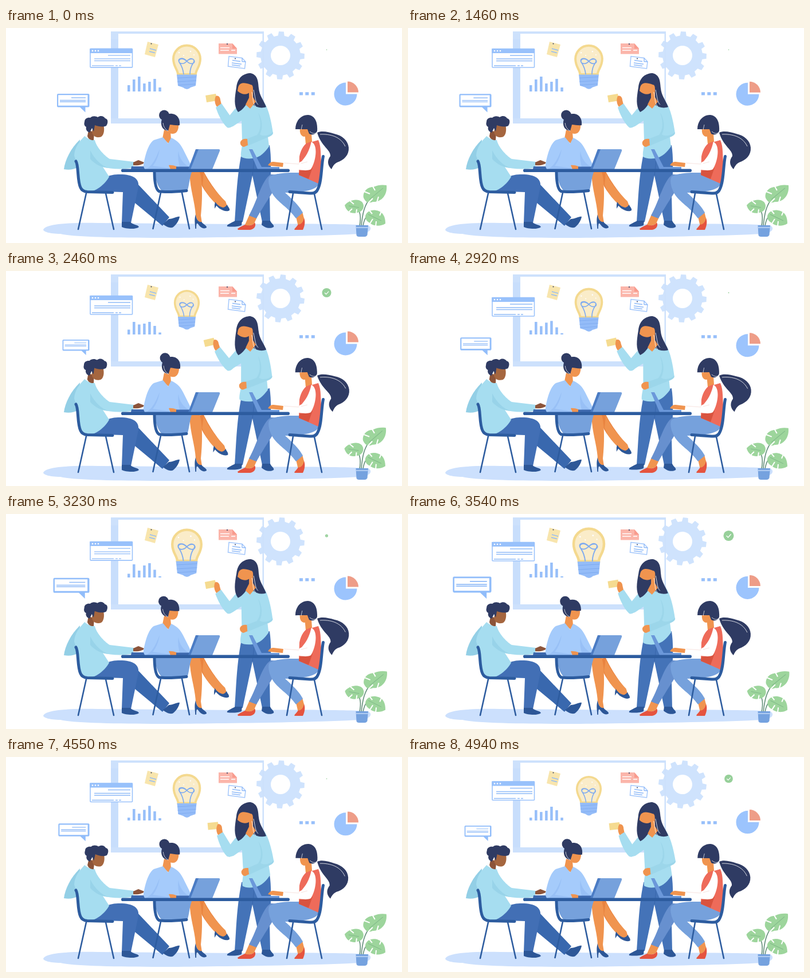
These frames come from a looping animation (691x376 px, 5040 ms). An HTML page:

```html
<!DOCTYPE html>
<html lang="en">
<head>
<meta charset="utf-8">
<title>Team meeting</title>
<style>
html, body { margin: 0; width: 100%; height: 100%; overflow: hidden; background: #fff; }
svg { display: block; width: 691px; height: 376px; }
.hair { fill: #2f3b63; }
.skin { fill: #f0944f; }
.tan { fill: #a5663f; }
.teal { fill: #a6ddf0; }
.teal2 { fill: #93cfe6; }
.navy { fill: #2d5797; }
.line { fill: none; stroke: #8fbaf8; stroke-width: 1.4; }
.chair { fill: none; stroke: #2d5c9f; stroke-linecap: round; stroke-linejoin: round; }
.white { fill: none; stroke: #fff; }
</style>
</head>
<body>
<svg viewBox="0 0 691 376">
  <path fill="#cce0fd" d="M65 353C68 344 100 340 160 341L400 343C480 342 600 342 632 345C640 349 637 358 620 360C520 365 380 366 300 367C200 367 120 366 95 360C75 360 66 356 65 353Z"/>

  <g id="gear" fill="#cfe3fd"><path id="cog"/><circle cx="479" cy="48" r="17" fill="#fff"/></g>
  <path fill="#cde1fc" fill-rule="evenodd" d="M183 6H450V167H183ZM196 10V158H447.500V10Z"/>
  <path fill="#bdd8fb" d="M183 20H196V158H183Z" opacity=".35"/>

  <g id="win">
    <rect x="147" y="36" width="73.500" height="32.500" rx="1" fill="#fff" stroke="#9ac2fb" stroke-width="1.600"/>
    <path fill="#98c1fb" d="M146.200 35.500H221V43.500H146.200Z"/>
    <g fill="#fff"><circle cx="151" cy="39.500" r="1.300"/><circle cx="156" cy="39.500" r="1.300"/><circle cx="161" cy="39.500" r="1.300"/></g>
    <path class="line" d="M178 47.500H217M154 53.500H217M154 57H217M150 65.500H188M191 65.500H195M197 65.500H201"/>
  </g>

  <g id="bars" fill="#97bff9"></g>

  <path fill="#f8e5ad" d="M247 24L266 29L260 51L242 46Z"/>
  <path class="line" d="M251 36L262 39M250 41L260 43.500"/>
  <circle cx="253.500" cy="27.500" r="1" class="hair"/>
  <path fill="#fbb5aa" d="M371 27H395L403 36V45.500H371Z"/>
  <path fill="#f89b8d" d="M395 27V36H403Z"/>
  <path class="white" stroke-width="1.600" d="M374 34.500H390M374 39H389M393 39H400"/>
  <circle cx="386" cy="28" r="1.100" class="hair"/>
  <path fill="#fff" stroke="#a3c7fb" stroke-width="1.500" d="M389 49.500L412 52.500L418 59L416.500 71L387.500 67Z"/>
  <path class="line" d="M412 52.500V58.500L418 59M395 56.500L409 58.500M394 61L411 63.300M394 64.500L409 66.500"/>
  <circle cx="400" cy="53.500" r="1" class="hair"/>

  <g id="bulb">
    <path fill="#faecc9" stroke="#f4d98f" stroke-width="4" d="M300 81C300 73 292 68 292 54A23.500 23.500 0 0 1 339 54C339 68 331 73 331 81Z"/>
    <path fill="none" stroke="#7fabef" stroke-width="1.700" d="M310 81C309 72 305 64 303 61C297 53 308 50 315.500 58C323 66 333 61 327 55C322 51 318 56 315.500 58C308 66 298 61 303 55C308 52 312 55 315.500 58C320 53 332 52 327 61C324 65 321 73 321 81"/>
    <path fill="#94bcf8" d="M298 81.500H333L331 101Q325 103 322 104Q316 110 309 104L300 101Z"/>
    <path fill="none" stroke="#7ba8ee" stroke-width=".8" d="M299 87.500L332 85.500M299 94L332 92M300 100L331 98"/>
    <g fill="#fff"><circle cx="302" cy="43" r="1.200"/><circle cx="322" cy="41" r="1.200"/><circle cx="328" cy="47" r="1"/><circle cx="310" cy="48" r="1"/></g>
  </g>

  <g id="bubble">
    <path fill="#91bdfa" d="M91 115H143.500Q145.500 115 145.500 117V136.500Q145.500 138.500 143.500 138.500H138.500V147.500L129 138.500H91Q89 138.500 89 136.500V117Q89 115 91 115Z"/>
    <path fill="#fff" d="M91.200 117.300H142.500V135.800H91.200Z"/>
    <path class="line" d="M114 122H139M94 126.500H139M94 129H139"/>
  </g>

  <path fill="#98c0fa" d="M512 112.300h6v5.200h-6zM522.300 112.300h6v5.200h-6zM532.800 112.300h6v5.200h-6z"/>
  <g id="pie">
    <path fill="#9cc4fd" d="M593 96A20 20 0 1 0 612.500 116H593Z"/>
    <path fill="#ee9d88" d="M596 94A19 19 0 0 1 615 113H596Z"/>
  </g>
  <g id="tick">
    <circle r="9.300" fill="#97d09a"/>
    <path class="white" stroke-width="1.400" d="M-4 0L-1 3L4.200 -2.800"/>
  </g>

  <!-- plant -->
  <g id="plant">
    <path fill="none" stroke="#638f7a" stroke-width="1.600" d="M620 346C622 325 625 310 636 297M617 346C620 330 618 320 612 314M623 346C625 334 630 326 637 325"/>
    <g fill="#9dd59c">
      <path d="M664 275C666 292 655 305 640 304C631 308 627 303 624 297C622 288 629 278 641 278C650 274 657 274 664 275Z"/>
      <path d="M591 310C598 301 613 297 621 304C627 311 624 321 613 323C603 326 594 321 591 310Z"/>
      <path d="M627 329C629 320 640 316 650 320C658 323 662 330 662 342C653 348 640 346 635 341C629 338 627 334 627 329Z"/>
    </g>
    <path class="white" stroke-width="2" d="M625 286L635 290M632 306L640 298M647 305L650 295M640 277L644 284M600 302L607 308M597 323L604 316M611 325L612 317M634 319L639 325M645 347L646 338M635 342L640 334M655 321L652 328"/>
    <path fill="none" stroke="#80b889" d="M658 280L634 300M598 311L616 314M632 326L655 337"/>
  </g>
  <path fill="#75a2df" d="M610.500 345H632L630.500 362Q629 365 626 365H616Q612 365 611.500 362Z"/>
  <path stroke="#d8e8ff" stroke-width="1.200" d="M611 349H631.500"/>

  <!-- standing woman -->
  <path fill="#4473b8" d="M411 219L460 205C463 225 463 250 460 290L461 339H447L430 258L413 339H399C402 300 402 265 411 219Z"/>
  <path fill="none" stroke="#3966ab" d="M430 258L433 232"/>
  <path class="navy" d="M400 337H412L411 345C405 348 393 348 386 347C384 344 393 341 400 337ZM447 337H461C463 342 469 345 467 348C460 352 451 349 446 344Z"/>
  <g id="torso">
    <path class="teal" d="M417 128L426 140L433 124L448 127C457 136 463 162 466 184C465 188 459 190 457 191L459 207C452 217 444 226 431 228C421 229 414 228 410 225C409 215 413 206 412 198L411 162L396 172L388 174L386 158L400 141Z"/>
    <path class="teal2" d="M440 148C446 165 445 178 438 187L417 195L422 206L457 191C463 189 466 186 466 182C458 189 448 190 443 186C449 175 447 158 440 148Z" opacity=".5"/>
    <path class="skin" d="M421 194L422 205L415 208C410 207 408 203 409 199Q412 193 421 194Z"/>
  </g>
  <g id="arm">
    <path fill="#f5db90" d="M348 118L366 115L369 127L350 130Z"/>
    <path class="skin" d="M366 119C370 117 374 121 374 126L376 134L368 138C363 131 364 123 366 119Z"/>
    <path class="teal" d="M366 139L376 132L390 152L400 164C397 172 391 176 386 174C377 166 370 151 366 139Z"/>
  </g>
  <g id="head3">
    <path class="hair" d="M402 104C404 86 415 79 427 79C440 82 440 95 441 105C442 118 449 125 454 138C446 141 437 139 431 134L424 126C419 134 414 143 405 147C397 136 399 122 402 104Z"/>
    <path class="skin" d="M418 134L424 122V104C426 97 431 98 431 106L431 121L436 129L426 141Z"/>
    <path class="skin" d="M405 104C407 96 414 94 427 99V111C421 118 411 117 404 110Z"/>
    <path class="white" stroke-width=".8" d="M429 112C432 124 430 133 436 137M432 108C435 121 435 130 440 134"/>
  </g>

  <!-- man -->
  <path fill="#3968ae" d="M210 264L230 273L285 331L273 346L213 296Z"/>
  <path class="navy" d="M284 334L274 343C280 348 288 351 292 348C298 343 302 336 303 330C298 329 293 334 284 334Z"/>
  <path fill="#426fb5" d="M142 285C160 267 178 255 198 256C223 256 233 264 231 278L218 341H202L204 287Z"/>
  <path class="navy" d="M202 339H217C220 344 231 344 232 348C226 353 208 351 202 348Z"/>
  <path class="teal2" d="M129 195C113 210 103 231 101 247C111 249 119 247 127 243Z"/>
  <path class="teal" d="M137 189C145 196 151 196 155 196C157 207 171 223 181 229L223 234L222 244C203 248 183 247 169 243L180 260C174 272 158 285 147 286L131 284C128 263 126 244 119 223C120 207 129 198 137 189Z"/>
  <path class="teal2" d="M147 214C154 229 166 240 178 245C165 243 155 238 147 229Z" opacity=".7"/>
  <path fill="#8c543a" d="M222 235L231 231L241 235C240 239 230 241 222 240Z"/>
  <g id="head1">
    <path fill="#8c5439" d="M144 179L154 182L153 196C147 197 143 193 142 189Z"/>
    <path class="tan" d="M152 170L170 169C173 180 170 191 163 191C156 192 151 188 150 182Z"/>
    <path class="hair" d="M137 164C137 158 143 156 147 157C151 153 157 154 160 156C166 152 171 155 173 158C179 159 178 167 175 171C169 174 161 172 155 170L153 181L150 175L146 183C140 181 139 176 140 173C136 171 136 167 137 164Z"/>
  </g>
  <path class="chair" stroke-width="5" d="M122 233C127 240 124 267 130 279Q133 286 142 286.500L186 287.500"/>
  <path class="chair" stroke-width="2.600" d="M140 289L126 352M174 289L188 352"/>

  <!-- seated woman, left -->
  <g id="shin">
    <path fill="#e9833f" d="M323 254L345 251C352 264 360 278 384 306L374 312C363 304 347 289 339 270Z"/>
    <path class="skin" d="M345 253C352 267 360 280 383 303L387 314L379 317L371 311C359 302 348 288 343 274Z"/>
    <path class="navy" d="M365 304C369 310 374 313 379 314C384 313 385 309 386 309C387 313 391 315 390 319C385 322 378 319 373 316C369 313 368 311 367 311L364 316L364 309Z"/>
  </g>
  <path class="skin" d="M321 252H338C343 265 343 299 340 328L342 341L336 341L331 328C330 304 319 275 321 252Z"/>
  <path class="navy" d="M331 326C332 335 336 340 341 339C345 344 351 346 350 349C346 352 340 350 336 344C333 340 332 341 332 351H330.300C330 342 328 335 331 326Z"/>
  <path fill="#76a1dc" d="M259 250H325C319 263 320 280 315 287H276C266 283 261 267 259 250Z"/>
  <path class="skin" d="M276 178L287 182L288 194L284 202L273 193Z"/>
  <path fill="#a5cbfb" d="M274 191L283 202L288 192C298 196 304 202 309 212L323 240L320 247H239C241 229 247 203 258 196Z"/>
  <path fill="#8fb9f2" d="M268 212C266 226 260 237 256 241L284 245V247H244C257 240 262 226 268 212ZM301 215C302 228 310 238 320 243L318 247H304C301 235 299 225 301 215Z" opacity=".55"/>
  <path class="skin" d="M284 240C291 239 302 243 304 247H287Z"/>
  <g id="head2">
    <path class="skin" d="M281 164L301 166C302 176 299 185 291 185C283 185 279 178 281 164Z"/>
    <circle cx="276" cy="152.500" r="9" class="hair"/>
    <path class="hair" d="M271 164C272 154 281 149 290 150C300 151 304 160 303 170C297 171 291 169 286 169L283 180C274 179 270 172 271 164Z"/>
    <path class="white" stroke-width=".7" d="M274 166Q275 176 283 180"/>
  </g>
  <path class="chair" stroke-width="5" d="M259 250C259 266 261 282 267 285.500Q280 288 315 284.500"/>
  <path class="chair" stroke-width="2.600" d="M270 288L256.500 351M307 288L320 351"/>

  <!-- seated woman, right -->
  <path fill="#e5543f" d="M404 351C410 347 415 345 419 343C424 347 431 345 434 340C437 345 434 352 426 353L405 353ZM503 352C506 348 509 346 510 342C515 344 519 338 519.500 331C523 338 521 347 518 353H504Z"/>
  <path class="skin" d="M425 326L438 331L433 342C428 346 421 346 417 344ZM506 330L517 321L520 333C518 341 513 345 509 343Z"/>
  <path fill="#6790cf" d="M462 256L486 257C472 276 451 309 437 333L424 328C439 301 446 266 462 256Z"/>
  <path fill="#76a1dc" d="M460 260C474 252 497 253 515 253L546 268C548 280 530 288 487 288C500 300 512 311 518 323L506 333C492 313 474 305 465 290C459 279 456 266 460 260Z"/>
  <g id="tail">
    <path class="hair" d="M543 183C551 179 563 182 573 185C587 188 597 197 598 209C599 222 590 231 578 235C572 238 570 243 568 247C561 240 560 232 566 224C567 213 550 207 543 183Z"/>
    <path class="white" stroke-width=".8" d="M548 186C566 185 584 190 592 207"/>
  </g>
  <path class="skin" d="M521 180L533 184L534 199L523 203Z"/>
  <path fill="#ee6b5a" d="M524 202L545 196C551 209 548 224 551 241C549 255 549 264 545 272L511 257L512 225C514 214 519 207 524 202Z"/>
  <path fill="#d9533f" d="M512 250L535 244L528 264L511 257Z"/>
  <path fill="#fff" d="M533 199C545 205 541 232 532 247C523 252 504 246 484 243L485 236L511 238L515 225C519 213 525 203 533 199Z"/>
  <path fill="#ee6b5a" d="M524 202L533 198C530 211 527 220 516 233L512 235C512 216 518 207 524 202Z"/>
  <path fill="none" stroke="#f4dcd7" stroke-width=".8" d="M515 237L526 234M485 236L511 238"/>
  <path class="skin" d="M484 236L483 243L461 241L457 240Q461 233 467 234Z"/>
  <g id="head4">
    <path class="skin" d="M513 174L529 173C530 184 527 190 520 190C514 189 512 183 513 174Z"/>
    <path class="hair" d="M505 177C505 162 515 152 527 152C540 153 544 166 543 180C541 186 534 188 529 185L526 177Z"/>
    <path class="white" stroke-width=".7" d="M515 178L517 169M530 181Q538 188 544 181"/>
  </g>
  <path class="chair" stroke-width="5" d="M553.500 224.500C550 242 551 269 544 282Q541 290 530 289L495 286.500"/>
  <path class="chair" stroke-width="2.600" d="M501 289L490 352M538 290L551 352"/>

  <!-- table -->
  <path fill="#3d69af" d="M219 242H240L242 247H218ZM297 242.500H322V247H297Z"/>
  <path fill="#4b7cc4" d="M331 212H339L326 247H318Z"/>
  <path fill="#76a1dc" d="M336 212H371Q374 212 373 215L360 247H322Z"/>
  <path fill="#6b98da" d="M424 212H430L446 243H477V247H439Z"/>
  <path fill="#2d5c9f" d="M203.500 246.500H492.500Q495 246.500 495 249.200T492.500 252H203.500Q201 252 201 249.200T203.500 246.500Z"/>
</svg>
<script>
const LOOP = 5040, START = 1460, STEP = 77, LAST = 45;
const $ = id => document.getElementById(id);
const put = (id, v) => $(id).setAttribute('transform', v);
const turn = (id, a, x, y) => put(id, `rotate(${a} ${x} ${y})`);
const grow = (id, s, x, y) => put(id, `translate(${x} ${y}) scale(${s}) translate(${-x} ${-y})`);
const wave = (t, mid, period) => Math.sin(2 * Math.PI * (t - mid) / period);

// gear outline
const TEETH = 12, pts = [];
for (let i = 0; i < TEETH; i++) {
  for (const [d, r] of [[-9, 35], [-6, 42], [6, 42], [9, 35]]) {
    const a = (i * 360 / TEETH + 2 + d) * Math.PI / 180;
    pts.push((479 + r * Math.sin(a)).toFixed(2) + ' ' + (48 - r * Math.cos(a)).toFixed(2));
  }
}
$('cog').setAttribute('d', 'M' + pts.join('L') + 'Z');

// top of each chart bar at the key times
const TIMES = [1460, 2000, 2920, 3540, 4160, 4940];
const TOPS = [
  [100, 101, 104, 105, 106, 106],
  [90, 89, 89, 87, 89, 93],
  [85, 90, 97, 101, 102, 96],
  [97, 94, 90, 90, 91, 94],
  [94, 91, 87, 85, 84, 87],
  [89, 93, 99, 96, 97, 93],
  [104, 106, 109, 109, 108, 106]
];
const bars = TOPS.map((_, i) => {
  const r = document.createElementNS('http://www.w3.org/2000/svg', 'rect');
  r.setAttribute('x', 212 + i * 9.05);
  r.setAttribute('width', 4.5);
  $('bars').append(r);
  return r;
});

function between(t, vals) {
  if (t <= TIMES[0]) return vals[0];
  let i = 0;
  while (i < TIMES.length - 2 && t > TIMES[i + 1]) i++;
  const k = Math.min(1, (t - TIMES[i]) / (TIMES[i + 1] - TIMES[i]));
  return vals[i] + (vals[i + 1] - vals[i]) * k;
}

function draw(now) {
  const ms = now % LOOP;
  const t = ms < START ? START - 20 : START + STEP * Math.min(LAST, Math.floor((ms - START) / STEP));
  const pulse = wave(t, 2940, 3000);
  const sway = wave(t, 3460, 4000);
  const beat = (1 - Math.cos(2 * Math.PI * (t - START) / 1500)) / 2;

  grow('bubble', 1 + 0.2 * pulse, 145.5, 144);
  grow('bulb', 1 + 0.135 * pulse, 315.5, 68);
  put('win', `translate(0 ${6.5 + 7 * Math.cos(2 * Math.PI * (t - 3660) / 5300)})`);
  put('pie', `translate(0 ${6 + 8.8 * Math.cos(2 * Math.PI * (t - 3080) / 4320)})`);
  put('tick', `translate(559.5 38) scale(${0.09 + 0.92 * beat * beat * (3 - 2 * beat)})`);
  turn('gear', 6 * beat, 479, 48);
  bars.forEach((r, i) => {
    const y = between(t, TOPS[i]);
    r.setAttribute('y', y);
    r.setAttribute('height', 111 - y);
  });

  turn('plant', 1.1 * pulse, 620, 346);
  turn('head1', 2 * sway, 148, 194);
  turn('head2', -2.6 * pulse, 282, 194);
  turn('shin', 3.2 * beat, 330, 255);
  turn('head3', pulse, 428, 125);
  turn('torso', -1.7 * sway, 425, 135);
  turn('arm', 4 * sway, 389, 168);
  turn('head4', 0.9 * sway, 528, 196);
  turn('tail', 1.8 * sway, 543, 183);
}

const first = performance.now();
function loop(now) {
  draw(Math.max(0, now - first));
  requestAnimationFrame(loop);
}
draw(0);
requestAnimationFrame(loop);
</script>
</body>
</html>
```
